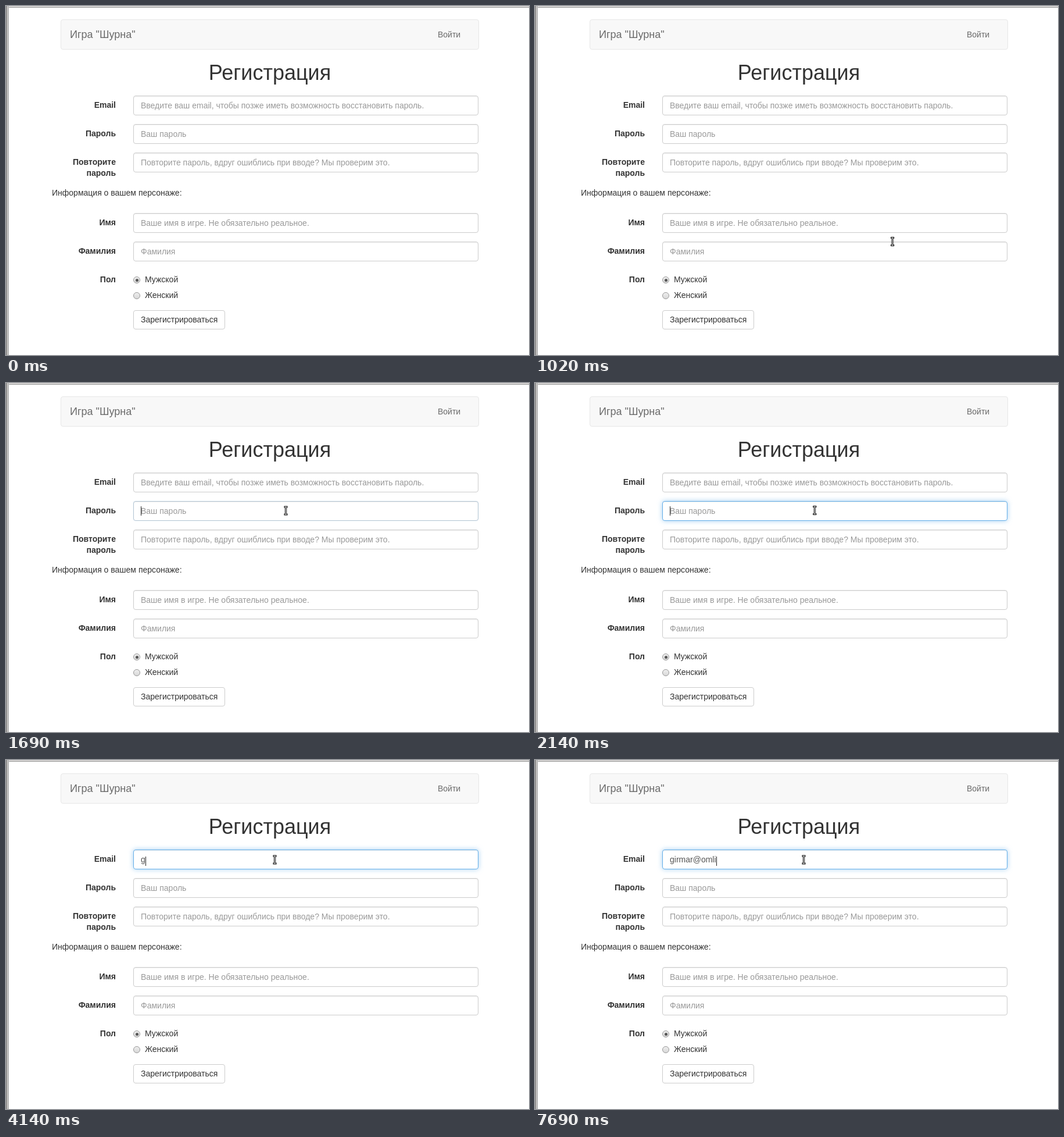
These frames come from a looping animation (900 by 600 pixels, 8 s). An HTML page:

```html
<!DOCTYPE html>
<html lang="ru">
<head>
<meta charset="utf-8">
<title>Регистрация</title>
<style>
html, body { margin: 0; width: 100%; height: 100%; overflow: hidden; }
body {
  position: relative; background: #fff; color: #333;
  font: 14px/19px "Liberation Sans", Arial, sans-serif;
}
body > * { position: absolute; box-sizing: border-box; white-space: pre; }
.top { left: 0; top: 0; width: 900px; height: 3px; background: #d5d3d2; border-bottom: 1px solid #999; }
.side { left: 0; top: 0; width: 5px; height: 600px; background: linear-gradient(90deg, #555 1px, #d0cecd 1px 3px, #8a8a8a 3px 4px, #ddd 4px); }
nav { left: 94px; top: 23px; width: 720px; height: 52px; background: #f8f8f8; border: 1px solid #e7e7e7; border-radius: 4px; color: #6a6a6a; }
nav b { position: absolute; left: 15px; top: 15px; font: 18px/20px "Liberation Sans", Arial, sans-serif; }
nav span { position: absolute; left: 648px; top: 16px; }
h1 { left: 94px; top: 95px; width: 720px; margin: 0; font-size: 36px; line-height: 39px; font-weight: 400; text-align: center; }
label { left: 60px; width: 129px; font-weight: 700; text-align: right; }
.field {
  left: 219px; width: 594px; height: 34px; padding: 7px 12px; color: #999;
  background: #fff; border: 1px solid #ccc; border-radius: 4px;
  box-shadow: inset 0 1px 1px rgba(0,0,0,.075);
}
.typed { color: #555; }
.caret { position: absolute; top: 8px; width: 1px; height: 16px; background: #222; }
.field > .caret { left: 12px; }
.field span .caret { position: relative; display: inline-block; top: 3px; margin: -3px 0; }
.radio { left: 219px; width: 12px; height: 12px; border: 1px solid #999; border-radius: 50%; background: linear-gradient(#eee, #d8d8d8); }
.on::after { content: ""; position: absolute; left: 2.5px; top: 2.5px; width: 5px; height: 5px; border-radius: 50%; background: #555; }
.button { left: 219px; top: 523px; width: 158px; height: 33px; padding: 6px 12px; border: 1px solid #ccc; border-radius: 4px; }

#email { animation: email 8s ease-in-out infinite; }
#pass { animation: pass 8s ease-in-out infinite; }
#pass .caret { animation: show 8s step-end infinite; }
#cursor { left: 0; top: 0; width: 1px; height: 1px; overflow: visible; animation: move 8s linear infinite; }
#arrow { animation: arrow 8s step-end infinite; }
#beam { animation: beam 8s step-end infinite; }

@keyframes email {
  0%, 30.19% { border-color: #ccc; box-shadow: inset 0 1px 1px rgba(0,0,0,.075); }
  32.06%, 100% { border-color: #66afe9; box-shadow: inset 0 1px 1px rgba(0,0,0,.075), 0 0 8px rgba(102,175,233,.6); }
}
@keyframes pass {
  0%, 20.5%, 32.06%, 100% { border-color: #ccc; box-shadow: inset 0 1px 1px rgba(0,0,0,.075); }
  22.38%, 30.19% { border-color: #66afe9; box-shadow: inset 0 1px 1px rgba(0,0,0,.075), 0 0 8px rgba(102,175,233,.6); }
}
@keyframes show {
  0%, 30.19% { opacity: 0; }
  20.5% { opacity: 1; }
}
@keyframes move {
  0%, 6.25% { transform: translate(866px, 590px); }
  12.75% { transform: translate(615.5px, 405.5px); }
  16.25% { transform: translate(495px, 248px); animation-timing-function: ease-out; }
  19.5%, 26.5% { transform: translate(481.5px, 219.5px); animation-timing-function: ease-in-out; }
  30%, 100% { transform: translate(462.5px, 171.5px); }
}
@keyframes arrow {
  0%, 11.5%, 13.2%, 15.4%, 16.9% { opacity: 0; }
  6.25%, 13%, 13.85%, 16.15% { opacity: 1; }
  27.6% { opacity: 1; }
  28.5%, 100% { opacity: 0; }
}
@keyframes beam {
  0%, 13%, 13.85%, 16.15%, 27.6% { opacity: 0; }
  11.5%, 13.2%, 15.4%, 16.9%, 28.5%, 100% { opacity: 1; }
}
</style>
</head>
<body>
<div class="top"></div>
<div class="side"></div>
<nav><b>Игра "Шурна"</b><span>Войти</span></nav>
<h1>Регистрация</h1>

<label style="top:161px">Email</label>
<div class="field" id="email" style="top:154px"><span id="text"></span></div>
<label style="top:210px">Пароль</label>
<div class="field" id="pass" style="top:203px">Ваш пароль<i class="caret"></i></div>
<label style="top:259px">Повторите
пароль</label>
<div class="field" style="top:252px">Повторите пароль, вдруг ошиблись при вводе? Мы проверим это.</div>

<div style="left:79px;top:312px">Информация о вашем персонаже:</div>

<label style="top:363px">Имя</label>
<div class="field" style="top:356px">Ваше имя в игре. Не обязательно реальное.</div>
<label style="top:412px">Фамилия</label>
<div class="field" style="top:405px">Фамилия</div>
<label style="top:461px">Пол</label>
<i class="radio on" style="top:465px"></i><div style="left:239px;top:461px">Мужской</div>
<i class="radio" style="top:492px"></i><div style="left:239px;top:488px">Женский</div>
<div class="button">Зарегистрироваться</div>

<svg id="cursor">
  <path id="arrow" d="M0 0V15L3.5 11.8L6 17.5L8.5 16.4L6 10.8H10.8Z" fill="#fff" stroke="#000"/>
  <g id="beam" fill="none">
    <path d="M-3 -6.5H3M-3 6.5H3M0 -7V7" stroke="#000" stroke-width="3"/>
    <path d="M-2 -6.5H2M-2 6.5H2M0 -6.5V6.5" stroke="#fff"/>
  </g>
</svg>

<script>
const LOOP = 8000;
const HINT = 'Введите ваш email, чтобы позже иметь возможность восстановить пароль.';
const CARET = '<i class="caret"></i>';

// [time, text, caret shown]
const steps = [
  [0, '', false], [2415, '', true], [3210, '', false],
  [4140, 'g', true], [4570, 'gir', true], [4970, 'gird', true],
  [5750, 'girdo', false], [5900, 'gird', true], [6610, 'girm', true],
  [6910, 'girmar', true], [7150, 'girmar@', true],
  [7480, 'girmar@om', true], [7690, 'girmar@omli', true]
];

const box = document.getElementById('text');
let start, shown;

function frame(now) {
  start ??= now;
  const t = (now - start) % LOOP;
  const step = steps.findLast(s => s[0] <= t);
  if (step !== shown) {
    const [, text, caret] = shown = step;
    const mark = caret ? CARET : '';
    box.className = text ? 'typed' : '';
    box.innerHTML = text ? text + mark : mark.replace('">', '" style="position:absolute;left:12px;top:8px;margin:0">') + HINT;
  }
  requestAnimationFrame(frame);
}
requestAnimationFrame(frame);
</script>
</body>
</html>
```
